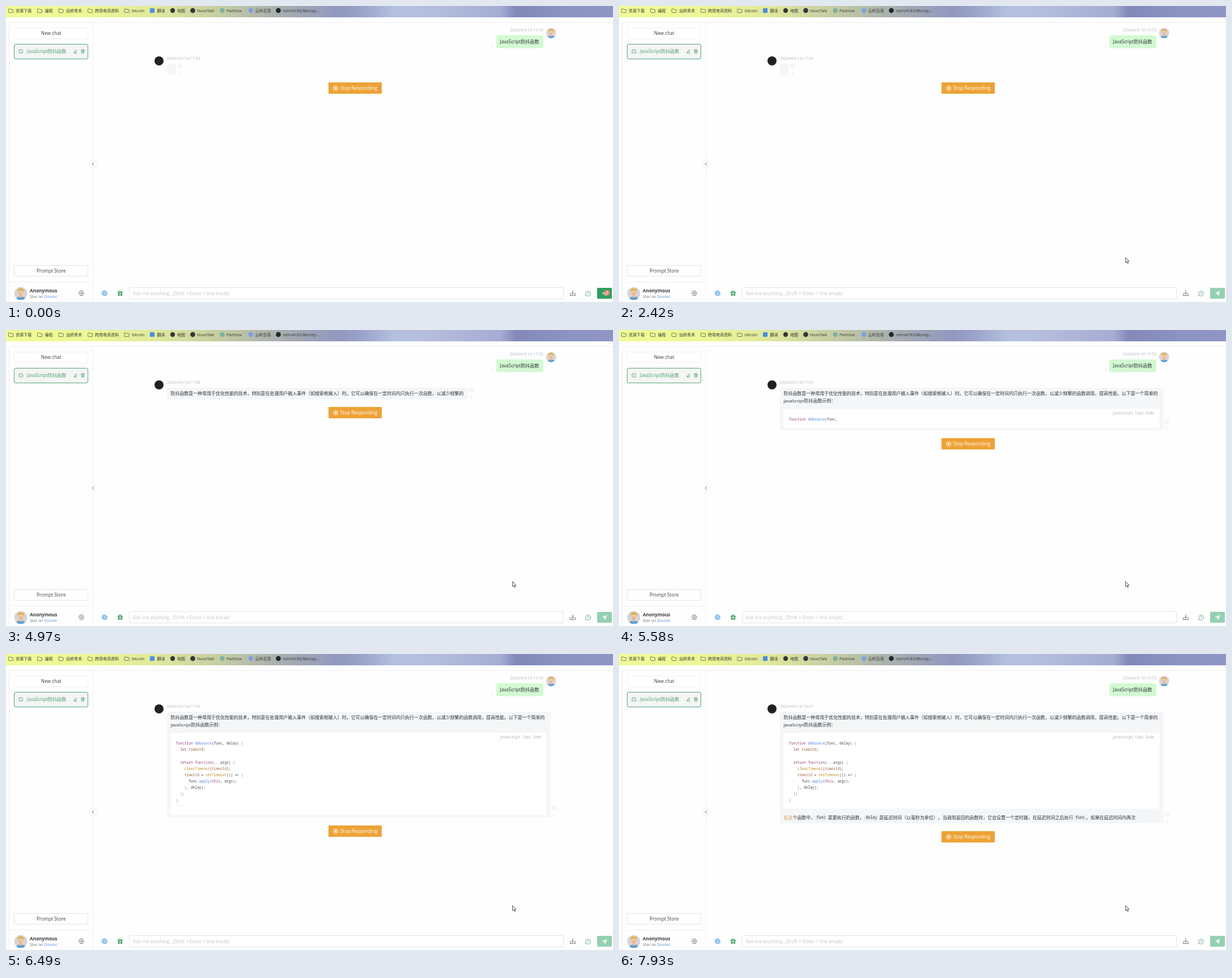
Write an HTML page that moves like this. It is 1071 by 523 pixels and loops after 8000 ms.

```html
<!DOCTYPE html>
<html lang="zh-CN">
<head>
<meta charset="utf-8">
<title>Chat</title>
<style>
html, body { margin: 0; width: 100%; height: 100%; overflow: hidden; background: #fefefe; }
svg { display: block; width: 1071px; height: 523px; }
text { font-family: "Open Sans", "Noto Sans CJK SC", "Noto Sans CJK", sans-serif; white-space: pre; text-spacing-trim: space-all; }
.ui { font-size: 8.25px; fill: #3a3d44; }
.mark { font-size: 7.05px; fill: #34372f; }
.time { font-size: 7.05px; fill: #b1b8c0; }
.body { font-size: 7.96px; fill: #2b2f36; }
.code { font: 6.2px "Noto Sans Mono", monospace; fill: #45464c; }
.chip { font: 6.7px "Noto Sans Mono", monospace; fill: #333841; }
.line { fill: none; stroke-width: .8; stroke-linecap: round; stroke-linejoin: round; }
.frame { fill: #fff; stroke: #e4e5e9; stroke-width: 1; }
</style>
</head>
<body>
<svg viewBox="0 0 1071 523">
  <defs>
    <linearGradient id="sky">
      <stop offset="0" stop-color="#f0fb95"/>
      <stop offset=".14" stop-color="#edf796"/>
      <stop offset=".25" stop-color="#dfe89c"/>
      <stop offset=".36" stop-color="#c3caa4"/>
      <stop offset=".46" stop-color="#a5acb0"/>
      <stop offset=".55" stop-color="#9198bf"/>
      <stop offset=".59" stop-color="#9ba4cb"/>
      <stop offset=".64" stop-color="#b5c0df"/>
      <stop offset=".7" stop-color="#b4bddd"/>
      <stop offset=".78" stop-color="#a9b2d6"/>
      <stop offset=".815" stop-color="#a4acd2"/>
      <stop offset=".84" stop-color="#8289b9"/>
      <stop offset=".92" stop-color="#8b93c2"/>
      <stop offset="1" stop-color="#8f96c6"/>
    </linearGradient>
    <path id="folder" class="line" stroke="#55584a" d="M.5 1.2Q.5.5 1.2.5H3.4L4.5 1.8H8Q8.7 1.8 8.7 2.5V6.4Q8.7 7 8 7H1.2Q.5 7 .5 6.4Z"/>
    <g id="dots" fill="#bcc0c6">
      <circle cy="-2.6" r=".55"/><circle r=".55"/><circle cy="2.6" r=".55"/>
    </g>
    <clipPath id="round"><circle r="10"/></clipPath>
    <g id="avatar" clip-path="url(#round)">
      <circle r="10" fill="#d3d5da"/>
      <path fill="#5b9fd6" d="M-7.5 10Q-7 5 0 4.6Q7 5 7.5 10Z"/>
      <path fill="#f0b58c" d="M-2 2H2V5.6Q0 7.4-2 5.6Z"/>
      <ellipse cy="-.8" rx="4.3" ry="5" fill="#f8cda6"/>
      <path fill="#e3b14f" d="M-5-.8Q-6.2-8 0-8.3Q6.2-8 5-.8Q4.2-4 1.8-4.3Q-2.5-3.5-4-4Z"/>
      <circle cx="-1.7" cy="-.8" r=".5" fill="#4c4037"/><circle cx="1.7" cy="-.8" r=".5" fill="#4c4037"/>
      <path class="line" stroke="#b5664f" d="M-1.4 1.9Q0 2.7 1.4 1.9"/>
    </g>
  </defs>

  <!-- bookmarks -->
  <rect width="1071" height="20" fill="url(#sky)"/>
  <use href="#folder" x="4" y="4.5"/><use href="#folder" x="55" y="4.5"/><use href="#folder" x="92.5" y="4.5"/>
  <use href="#folder" x="144" y="4.5"/><use href="#folder" x="208.5" y="4.5"/>
  <rect x="254" y="4" width="8" height="8" rx="1" fill="#4b8de0"/>
  <circle cx="294" cy="8" r="4.2" fill="#33363a"/>
  <circle cx="329.5" cy="8" r="4.4" fill="#33363a"/>
  <circle cx="381.5" cy="8" r="4.2" fill="#79b29c"/>
  <circle cx="432" cy="8" r="4.2" fill="#7d9ee6"/>
  <circle cx="480.5" cy="8" r="4.4" fill="#24282d"/>
  <g class="mark">
    <text x="17" y="10.7">资源下载</text>
    <text x="68.5" y="10.7">编程</text>
    <text x="106" y="10.7">远桥青禾</text>
    <text x="157" y="10.7">跨境电商资料</text>
    <text x="222" y="10.7">bitcoin</text>
    <text x="266.5" y="10.7">翻译</text>
    <text x="302" y="10.7">地图</text>
    <text x="337" y="10.7">NuvoTalk</text>
    <text x="389" y="10.7">Parlmox</text>
    <text x="439.5" y="10.7">云岭百答</text>
    <text x="488.5" y="10.7">nelro4182/Money...</text>
  </g>

  <!-- sidebar -->
  <path d="M1071 29H9Q5.5 29 5.5 32.5V523" fill="none" stroke="#ebecef"/>
  <path d="M153.5 29V523M5.5 487.5H153.5" stroke="#f0f1f3"/>
  <rect class="frame" x="14.5" y="39" width="130" height="19" rx="1.5" stroke-dasharray="2 1.5"/>
  <text class="ui" x="79.7" y="51.2" text-anchor="middle">New chat</text>
  <rect x="14.5" y="67.5" width="130" height="26" rx="2.5" fill="#f4f5f5" stroke="#57a577"/>
  <g class="line" stroke="#4b9e6c">
    <path d="M23.8 77.4H28.7Q29.4 77.4 29.4 78V83.2H23.8Q23 83.2 23 82.5V78Q23 77.4 23.8 77.4M25 80.4H25.2M27.2 80.4H27.4"/>
    <path d="M120.3 83.2H125.3M120.5 81.4L123.7 77.6L125 78.7L121.8 82.2L120.2 82.4Z"/>
    <path d="M132.4 78.2H138.6M134.2 78V76.9H136.8V78M133.2 78.4L133.5 83.2H137.5L137.8 78.4M134.8 80V81.8M136.2 80V81.8"/>
  </g>
  <text x="37" y="83" font-size="8.1" fill="#4b9e6c">JavaScript防抖函数</text>
  <rect class="frame" x="14.5" y="458.5" width="130" height="19" rx="1.5"/>
  <text class="ui" x="79.7" y="470.8" text-anchor="middle">Prompt Store</text>
  <use href="#avatar" transform="translate(26 508) scale(1.15)"/>
  <text class="ui" x="42" y="506" font-weight="700" style="font-size:8.15px">Anonymous</text>
  <text x="42" y="516.1" font-size="7" fill="#71757c">Star on <tspan fill="#5a8fe0">Dovnel</tspan></text>
  <g class="line" stroke="#4a4d52">
    <path d="M131 503.6H135L137.4 507.6L135 511.6H131L128.6 507.6Z"/><circle cx="133" cy="507.6" r="1.5"/>
  </g>
  <circle cx="153.5" cy="279.3" r="6.6" fill="#fff" stroke="#eff0f2"/>
  <path class="line" stroke="#3b3e44" stroke-width="1" d="M154.8 276.4L151.9 279.3L154.8 282.2"/>

  <!-- footer -->
  <g class="line" stroke="#3f93d8">
    <circle cx="173.7" cy="507.4" r="4.2"/><ellipse cx="173.7" cy="507.4" rx="1.9" ry="4.2"/>
    <path d="M169.7 506H177.7M169.7 509H175M175.5 510.3L176.8 511.6L179 509.2"/>
  </g>
  <path fill="#4b9e6c" d="M197 505H200.8V507.5H197ZM201.8 505H205.9V507.5H201.8ZM197.6 508.3H200.8V512H197.6ZM201.8 508.3H205.2V512H201.8Z"/>
  <path class="line" stroke="#4b9e6c" d="M201.3 504.8Q198 504.8 198.8 503.2Q200.2 502.4 201.3 504.8Q202.4 502.4 203.8 503.2Q204.6 504.8 201.3 504.8"/>
  <rect class="frame" x="217.5" y="497.5" width="766" height="20" rx="1.5"/>
  <text x="223.8" y="510.5" font-size="8.35" fill="#c3c5ca">Ask me anything...(Shift + Enter = line break)</text>
  <path class="line" stroke="#4a4d52" d="M995.6 508V511.6H1004.4V508M1000 503.4V509M997.7 507L1000 509.2L1002.3 507"/>
  <g class="line" stroke="#4b9e6c"><path d="M1023.3 510A4.4 4.4 0 1 1 1025 511.8L1022.6 512Z"/><path d="M1027 505.3V508H1029"/></g>
  <rect id="send" x="1043" y="498" width="26" height="19.3" rx="1.2"/>
  <path fill="#fff" d="M1060.6 503.2L1051.4 507.4L1054.6 508.6ZM1060.8 503.5L1055.3 509L1057.4 512.3Z"/>

  <!-- question -->
  <text class="time" x="948" y="45.4" text-anchor="end">2024/4/9 14:17:53</text>
  <rect x="865" y="52" width="83" height="22.5" rx="3" fill="#d2f9d1"/>
  <text x="871.5" y="66" font-size="8.1" fill="#2b2f36">JavaScript防抖函数</text>
  <use href="#dots" x="858.6" y="70.3"/>
  <use href="#avatar" transform="translate(961.8 47.8) scale(.92)"/>

  <!-- answer -->
  <circle cx="270" cy="97" r="8" fill="#202123"/>
  <text id="stamp" class="time" x="283.6" y="95"></text>
  <rect id="bubble" x="284" y="102" rx="2.5" fill="#f4f6f8"/>
  <g id="answer"></g>
  <rect id="caret" x="290.5" y="106.5" width="2.2" height="11" fill="#222"/>
  <g id="tools">
    <circle r="3" cy="-16.2" fill="none" stroke="#d9dce0" stroke-width=".8"/>
    <use href="#dots" y="-4"/>
  </g>
  <g id="stop">
    <rect x="569" width="94" height="20" rx="1.2" fill="#eea236"/>
    <circle cx="581.7" cy="10.2" r="3.9" fill="none" stroke="#fff"/>
    <rect x="580.1" y="8.6" width="3.2" height="3.2" rx=".8" fill="#fff"/>
    <text x="589.7" y="13.2" font-size="8.3" fill="#fff">Stop Responding</text>
  </g>

  <!-- pointers -->
  <path id="arrow" fill="#fff" stroke="#222" stroke-width=".8" d="M0 0V9L2 7.2L3.6 10.5L5 9.9L3.5 6.7H6.2Z"/>
  <g id="blocked" fill="none">
    <circle r="4" stroke="#fff" stroke-width="2.2"/>
    <circle r="4" fill="#f6e3da" stroke="#d8542f" stroke-width="1.5"/>
    <path d="M-2.8-2.8L2.8 2.8" stroke="#d8542f" stroke-width="1.5"/>
  </g>
</svg>
<script>
const LOOP = 8000, EM = 7.96, LEFT = 290.5, ROW = 11.15;
const line1 = "防抖函数是一种常用于优化性能的技术，特别是在处理用户输入事件（如搜索框输入）时。它可以确保在一定时间内只执行一次函数，以减少频繁的函数调用，提高性能。以下是一个简单的";
const line2 = "JavaScript防抖函数示例：";
const code = `function debounce(func, delay) {
  let timerId;

  return function(...args) {
    clearTimeout(timerId);
    timerId = setTimeout(() => {
      func.apply(this, args);
    }, delay);
  };
}
\`\``;
// x, text, inline code
const outro = [
  [LEFT, "在这个函数中，"], [348.6, "func", 1],
  [368.8, "是要执行的函数，"], [435.2, "delay", 1],
  [459.3, "是延迟时间（以毫秒为单位）。当调用返回的函数时，它会设置一个定时器，在延迟时间之后执行"],
  [805.7, "func", 1], [824, "。如果在延迟时间内再次"]
];
const codeAt = line1.length + line2.length;
const outroAt = codeAt + code.length + 1;

// start, end, steps, characters at start, characters at end
const bursts = [
  [3810, 3880, 2, 4, 9], [3950, 4490, 9, 12, 44],
  [4630, 4970, 6, 47, 65], [5100, 5370, 4, 74, 100],
  [5440, 5580, 3, 109, 123], [5649, 6200, 9, 135, 231],
  [6270, 6490, 4, 243, 292], [6560, 7030, 7, 293, 299],
  [7100, 7850, 11, 301, 373], [7930, 7930, 1, 375, 375]
];
const stamps = [[0, "17:53"], [3810, "17:57"], [4630, "17:58"], [5440, "17:59"], [6560, "18:00"], [7400, "18:01"]];
const blinks = [690, 1220, 1810, 2420, 3020, 3610];

const $ = id => document.getElementById(id);
const set = (id, attrs) => { for (const k in attrs) $(id).setAttribute(k, attrs[k]); };
const move = (id, x, y) => set(id, { transform: `translate(${x} ${y})` });
const text = (cls, x, y, s) => `<text class="${cls}" x="${x}" y="${y}">${s}</text>`;
const box = (x, y, w, h, fill) => `<rect x="${x}" y="${y}" width="${w}" height="${h}" rx="2" fill="${fill}"/>`;
const tint = (s, color) => `<tspan fill="${color}">${s}</tspan>`;

const rules = [
  [/^(function|let|return|this)$/, "#98407f"],
  [/^(debounce|apply)$/, "#4f86e6"],
  [/^(clearTimeout|setTimeout)$/, "#c18a24"],
  [/^timerId$/, "#a0623c"],
  [/^[{}`]$/, "#b98a4c"]
];
const paint = s => s.replace(/\w+|[{}`>]/g, w => {
  const rule = rules.find(r => r[0].test(w));
  return rule ? tint(w, rule[1]) : w.replace(">", "&gt;");
});

function typed(t) {
  let n = 0;
  for (const [a, b, steps, from, to] of bursts) {
    if (t < a) break;
    const k = steps < 2 ? 0 : Math.min(steps - 1, Math.floor((t - a) / (b - a) * (steps - 1) + 1e-6));
    n = Math.round(from + (steps < 2 ? 0 : (to - from) * k / (steps - 1)));
  }
  return n;
}

function drawOutro(n) {
  let out = "";
  for (const [x, s, isCode] of outro) {
    if (n <= 0) break;
    const part = s.slice(0, n);
    if (isCode) out += box(x - 2.2, 284.3, part.length * 4.02 + 4.4, 10, "#e7e9ed") + text("chip", x, 291.4, part);
    else out += text("body", x, 291.8, x === LEFT ? tint(part.slice(0, 2), "#dd923d") + part.slice(2) : part);
    n -= s.length;
  }
  return out;
}

let shown = -1;
function drawAnswer(n) {
  if (n === shown) return;
  shown = n;
  let right = n ? LEFT + EM * Math.min(n, line1.length) + 6.5 : 300;
  let bottom = n ? 122.6 : 121.9;
  let out = text("body", LEFT, 115.4, line1.slice(0, n));
  if (n > line1.length) {
    out += text("body", LEFT, 127.6, line2.slice(0, n - line1.length));
    right = 960.5;
    bottom = 134.6;
  }
  if (n > codeAt) {
    const closed = n >= outroAt;
    const rows = (closed ? code.slice(0, -3) : code.slice(0, n - codeAt)).split("\n");
    const extra = ROW * (rows.length - 1);
    out += box(LEFT, 139.3, 663, 33.7 + extra, "#fff") + text("code", 870, 149, tint("javascript Copy Code", "#abaeb4"));
    rows.forEach((s, i) => out += text("code", 300, 160.2 + ROW * i, paint(s)));
    bottom = 177.5 + extra;
    if (n > outroAt) {
      out += drawOutro(n - outroAt);
      bottom = 299.3;
    }
  }
  $("answer").innerHTML = out;
  set("bubble", { width: right - 284, height: bottom - 102 });
  move("tools", right + 6.3, bottom);
  move("stop", 0, Math.round(bottom + 13.5));
}

function drawPointer(t) {
  const step = t < 70 ? 0 : Math.min(8, Math.floor((t - 70) / 68.5) + 1);
  const p = 1 - (1 - step / 8) ** 2;
  const x = 1060 - 166.3 * p, y = 507 - 62.6 * p;
  const over = x > 1043 && y > 498;
  set("blocked", { visibility: over ? "visible" : "hidden" });
  set("arrow", { visibility: over ? "hidden" : "visible" });
  move("blocked", x, y);
  move("arrow", x, y);
  const f = Math.min(1, step / 4);
  const mix = (a, b) => Math.round(a + (b - a) * f);
  set("send", { fill: `rgb(${mix(47, 148)},${mix(157, 208)},${mix(99, 177)})` });
}

function frame() {
  const t = performance.now() % LOOP;
  drawAnswer(typed(t));
  drawPointer(t);
  $("stamp").textContent = "2024/4/9 14:" + stamps.filter(s => t >= s[0]).pop()[1];
  const on = blinks.filter(b => t >= b).length % 2;
  set("caret", { visibility: on ? "visible" : "hidden" });
  requestAnimationFrame(frame);
}
frame();
</script>
</body>
</html>
```
